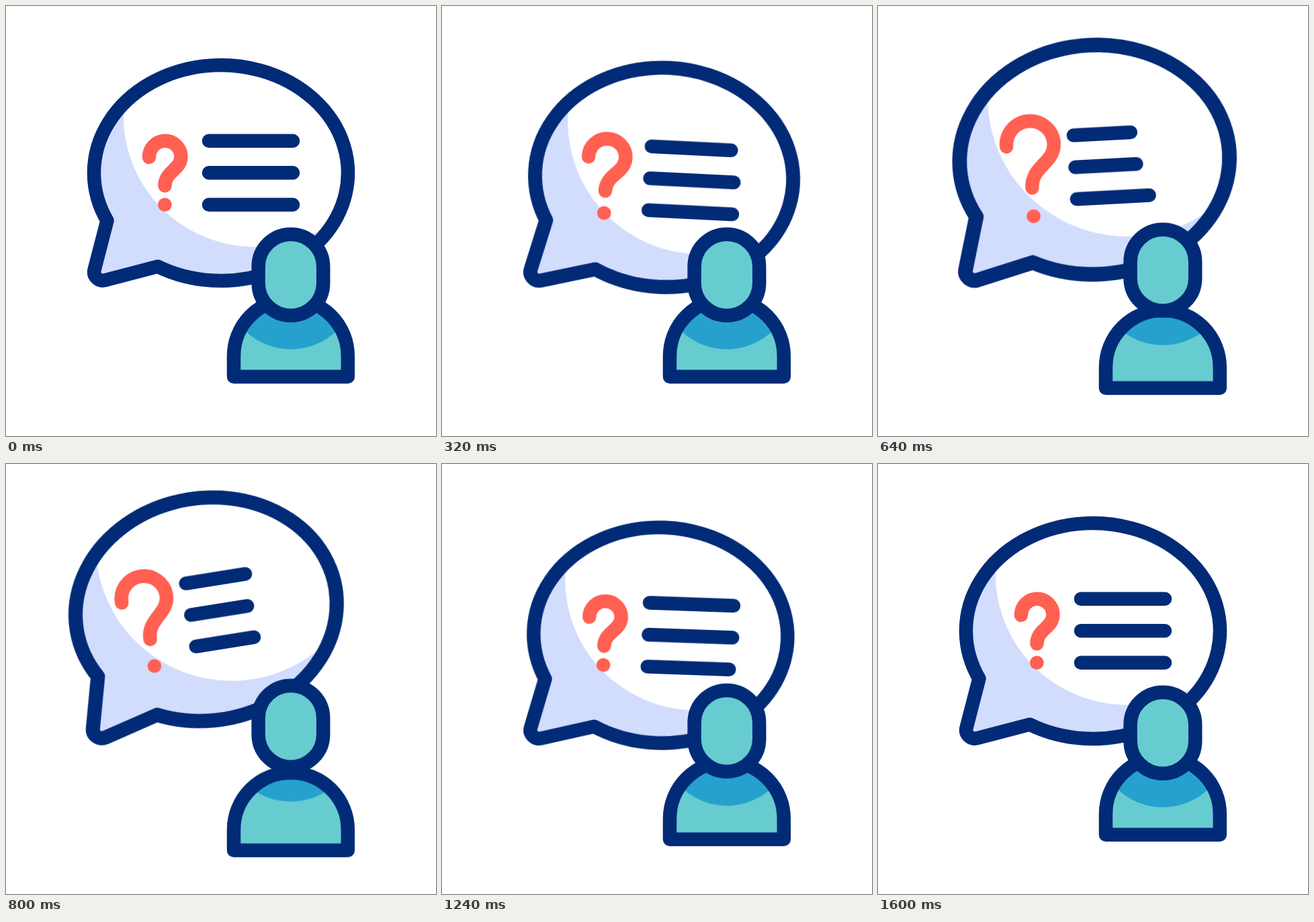
Animation, 640 px wide and 640 px high, one loop 1.64 s. Source, as an HTML page:

```html
<!DOCTYPE html>
<html lang="en">
<head>
<meta charset="utf-8">
<title>Question bubble</title>
<style>
  html, body { margin: 0; height: 100%; overflow: hidden; background: #fff; }
  svg { display: block; width: 100vw; height: 100vh; }

  .ink, .mark { fill: none; stroke-width: 20.5; stroke-linecap: round; stroke-linejoin: round; vector-effect: non-scaling-stroke; }
  .ink { stroke: #022b77; }
  .mark { stroke: #ff6051; }

  .talk, .bubble, .mark, .dot, .lines path, .body, .head, .shade {
    animation: 1640ms cubic-bezier(.333, 0, .667, 1) infinite;
  }
  .talk { transform-origin: 140px 405px; animation-name: sway; }
  .bubble { transform-origin: 140px 405px; animation-name: swell; }
  .mark { transform-origin: 236.6px 251px; animation-name: grow; }
  .dot { animation-name: drop; }
  .lines path { transform-origin: 302px 0; animation-name: shrink; }
  .lines path:nth-child(2) { animation-delay: 120ms; }
  .lines path:nth-child(3) { animation-delay: 240ms; }
  .body, .head, .shade { animation-name: part; }
  .body { --dy: 23.3px; }
  .head { --dy: -9.9px; }
  .shade { --dy: -31.8px; } /* relative to the body */

  @keyframes sway {
    0%, 1.22% { transform: rotate(0deg); }
    28.05% { transform: rotate(3.7deg); }
    49.39%, 50% { transform: rotate(-9.1deg); }
    77.07% { transform: rotate(2.1deg); }
    97.56%, 100% { transform: rotate(0deg); }
  }
  @keyframes swell {
    0%, 12.2%, 58.84%, 100% { transform: scale(1); }
    34.15%, 39.02% { transform: scale(1.063); }
  }
  @keyframes grow {
    0%, 9.51%, 68.54%, 100% { transform: scale(1); }
    35.43%, 42.62% { transform: scale(1.49); }
  }
  @keyframes drop {
    0%, 9.51%, 68.54%, 100% { transform: translateY(0); }
    35.43%, 42.62% { transform: translateY(22.2px); }
  }
  @keyframes shrink {
    0%, 13.41%, 64.57%, 100% { transform: scaleX(1); }
    37.8%, 44.76% { transform: scaleX(.68); }
  }
  @keyframes part {
    0%, 21.34%, 85.37%, 100% { transform: translateY(0); }
    48.48%, 58.23% { transform: translateY(var(--dy)); }
  }
</style>
</head>
<body>
<svg viewBox="0 0 640 640">
  <defs>
    <path id="balloon" d="M150.5 319.5A189 160.5 0 1 1 226 387.7L147.5 408.2C138 410.5 129 402 131.6 392.5Z"/>
    <path id="torso" d="M339 551.8V521A84.9 84.9 0 0 1 508.8 521V551.8Z"/>
    <clipPath id="inBalloon"><use href="#balloon"/></clipPath>
    <clipPath id="inTorso"><use href="#torso"/></clipPath>
  </defs>

  <g class="talk">
    <g class="bubble">
      <use href="#balloon" fill="#d2dcfd"/>
      <g clip-path="url(#inBalloon)"><ellipse cx="371" cy="164.5" rx="196" ry="194" fill="#fff"/></g>
      <use href="#balloon" class="ink"/>
    </g>
    <path class="mark" d="M213 225A23.75 23.75 0 0 1 260.5 224C260.5 244 236.5 246 236.5 267.5"/>
    <circle class="dot" cx="236.4" cy="295.8" r="10.3" fill="#ff6051"/>
    <g class="lines">
      <path class="ink" d="M302 200.8H427"/>
      <path class="ink" d="M302 248.2H427"/>
      <path class="ink" d="M302 295.7H427"/>
    </g>
  </g>

  <g class="body">
    <use href="#torso" fill="#67ccd0"/>
    <g clip-path="url(#inTorso)"><circle class="shade" cx="424" cy="413" r="98" fill="#26a1cd"/></g>
    <use href="#torso" class="ink"/>
  </g>
  <g class="head">
    <rect x="375.6" y="339.7" width="96.6" height="121" rx="48.3" fill="#67ccd0"/>
    <rect class="ink" x="375.6" y="339.7" width="96.6" height="121" rx="48.3"/>
  </g>
</svg>
</body>
</html>
```
